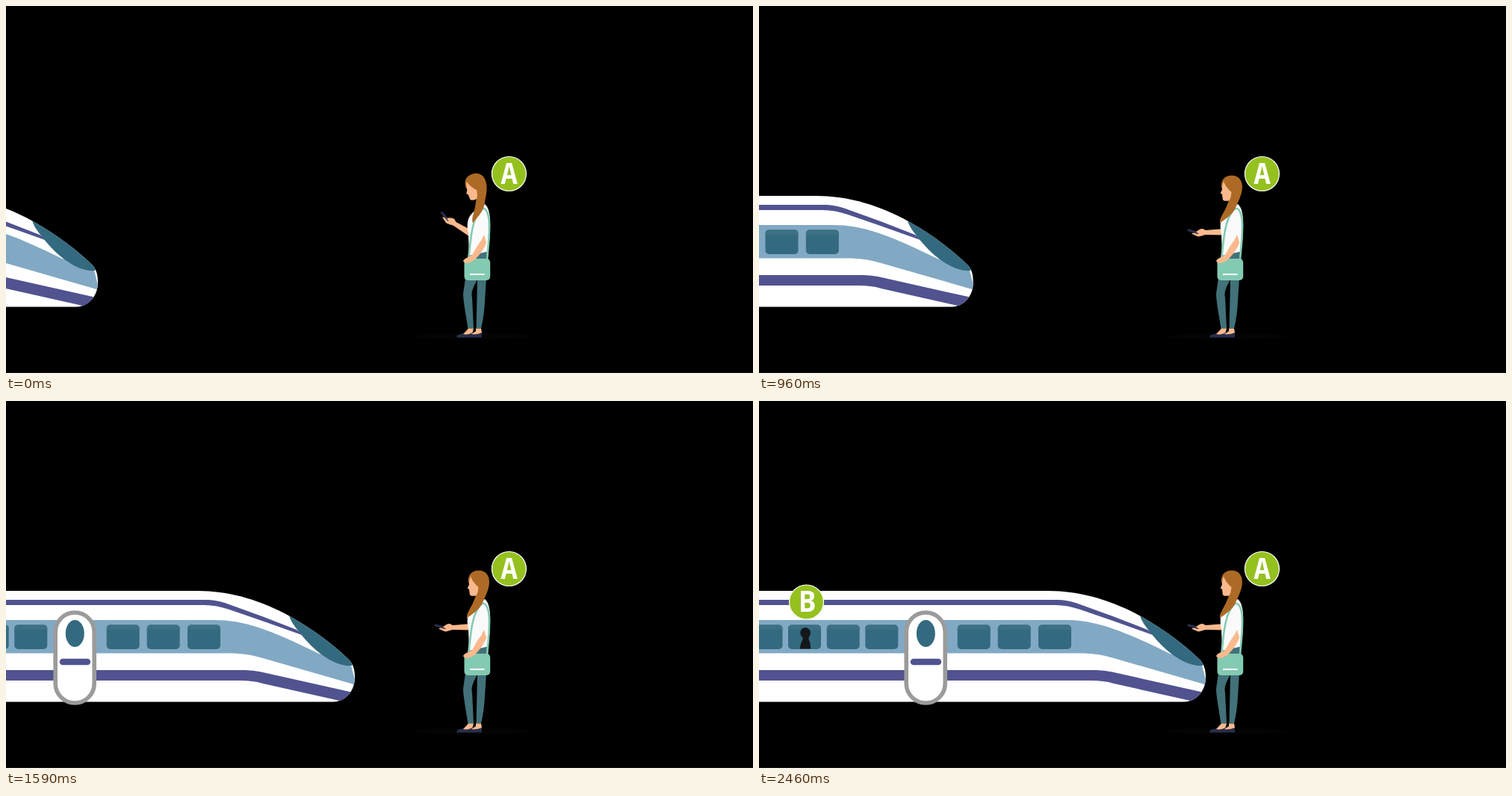
An HTML page that plays this animation: 1000 px wide and 491 px high, repeating every 3600 ms.

```html
<!DOCTYPE html>
<html lang="en">
<head>
<meta charset="utf-8">
<title>Train arriving</title>
<style>
  html, body { margin: 0; width: 100%; height: 100%; overflow: hidden; background: #000; }
  svg { display: block; width: 100%; height: 100%; }
  .glass { fill: #346a7f; }
  .purple { fill: #50538f; }
  .skin { fill: #fab98d; }
  .pants { fill: #42717a; }
  .navy { fill: #282e4b; }
  .badge circle { fill: #95c11f; stroke: #fff; stroke-width: 1.2; }
  .badge text {
    font: bold 38.5px "Noto Sans Mono", "DejaVu Sans Mono", monospace;
    fill: #fff; text-anchor: middle;
  }
</style>
</head>
<body>
<svg viewBox="0 0 1000 491">
  <defs>
    <clipPath id="hull">
      <path d="M-40 254H388C432 254 475 268 511 288C545 307 570 327 590 346C596 352 598 360 598 370C598 388 585 402.5 569 402.5H-40z"/>
    </clipPath>
  </defs>
  <rect width="1000" height="491"/>
  <rect y="490" width="1000" height="1" fill="#111"/>
  <ellipse cx="625" cy="442" rx="80" ry="4" fill="#040404"/>

  <g id="train">
    <g clip-path="url(#hull)">
      <rect x="-40" y="250" width="640" height="156" fill="#fff"/>
      <path class="purple" d="M-40 266H396C409 266 419 268 428 271.5L475 288.5L520 306L530 314L475 294.5L430 279C418 275 408 273 396 273H-40z"/>
      <path fill="#82a9c4" d="M-40 293H410C450 293 485 306 550 338L592 350L600 380L480 345.5C460 339.5 448 337.5 428 337.5H-40z"/>
      <path class="purple" d="M-40 360H447C458 360 466 361 475 363L600 391V406L475 378C465 375 456 374 445 374H-40z"/>
      <path class="glass" d="M508 284L600 343L594 354C572 356 546 336 530 317C520 305 513 297 510 287z"/>
    </g>
    <g id="windows"></g>
    <path fill="#14171a" d="M55 331.5C55 325 58 321 59 317C54 314 54 305 60 303.5C67 302 71 309 68 314C66 317 66 319 68 322C69 326 69 329 69 331.5z"/>
    <rect x="197.2" y="283" width="52" height="121" rx="26" fill="#fff" stroke="#9b9b9a" stroke-width="5.6"/>
    <ellipse class="glass" cx="223.3" cy="311" rx="12.5" ry="18"/>
    <rect class="purple" x="202.7" y="344.7" width="41.5" height="8.6" rx="4.3"/>
    <circle cx="63.5" cy="269" r="24.3" fill="#000" opacity=".1"/>
    <g class="badge"><circle cx="63.5" cy="269" r="23"/><text x="64.5" y="282">B</text></g>
  </g>

  <g id="woman">
    <path class="pants" d="M620 331L645 326V342H619zM615 364H632C626 375 622 383 624 390L626 431.5L618.5 432C616 415 612 395 612 385zM631 364H643L641 395Q640 415 636 431.5H629.5L630.5 390z"/>
    <path class="navy" d="M603.5 443.5V441C608 438 614 438 618 438L637 436.5V443.5z"/>
    <path class="skin" d="M619 431.5H626L624.5 437Q619 440.5 612 439zM629 431.5H636L637 437Q630 440 623 439L629 435z"/>
    <g id="arm">
      <path class="skin" d="M623 298L598 300L594 298C591 298 588 300 585 302L579 304.5L582 306L588 308.5C592 308 595 306.5 598 306L623 306.5z"/>
      <path d="M575 300L587.5 303.5" fill="none" stroke="#282e4b" stroke-width="3" stroke-linecap="round"/>
      <path class="skin" d="M585 302.5L591 298.5L595 300L589 304.5z"/>
    </g>
    <path fill="#fafafa" d="M641 265C647 270 649 282 648 300C648 315 645 324 645 328.5L620 334L619 305C617 296 617 287 621 281C626 274 634 268 641 265z"/>
    <path d="M619 340C622 310 624 285 635 273C642 266 647 277 647 295C647 315 645 325 644 340" fill="none" stroke="#83cbb4" stroke-width="2.6"/>
    <rect x="613.5" y="338" width="34.7" height="29" rx="5" fill="#83cab2"/>
    <rect x="621" y="358" width="19.5" height="2" fill="#fff"/>
    <path class="skin" d="M640 306L643 316C642 322 636 331 628 339C622 344 614 346 612 341C614 337 620 336 624 333C628 326 632 318 636 314z"/>
    <g id="head">
      <path fill="#ad6a26" d="M619 243C618 232 624 226.8 633 226.8C644 226.8 648.5 236 646.5 247C645 256 641 262 638 270C633 280 624 285 617 290.5C616 284 623 276 626 268L630 258z"/>
      <path class="skin" d="M622 234.5C620 239 620 243 620 245.5L617.8 250.5L620 252L620.7 258C621 261.5 625 261 629.5 260.5L631.5 256L632.5 249C629 246 624 241 622 234.5z"/>
    </g>
  </g>
  <g class="badge"><circle cx="673.4" cy="224.5" r="23"/><text x="673.5" y="237.5">A</text></g>
</svg>
<script>
  const LOOP = 3600, TICK = 30, RIDE = 2430, LOOK = 960;
  const el = id => document.getElementById(id);
  const [train, arm, head] = ['train', 'arm', 'head'].map(el);

  el('windows').innerHTML = [-12.5, 39, 90.7, 142.3, 265.7, 319.7, 374].map(x => `
    <rect class="glass" x="${x}" y="299.5" width="44" height="32.5" rx="5"/>
    <path fill="#3d7085" d="M${x} 306v-1.5q0 -5 5 -5h34q5 0 5 5v1.5z"/>`).join('');

  const ease = (t, span) => {
    const u = Math.min(t / span, 1);
    return u * u * (3 - 2 * u);
  };

  const start = performance.now();
  function draw(now) {
    const t = Math.floor(Math.max(now - start, 0) % LOOP / TICK) * TICK;
    const look = 1 - ease(t, LOOK);
    train.setAttribute('transform', `translate(${475 * (ease(t, RIDE) - 1)} 0)`);
    arm.setAttribute('transform', `rotate(${33 * look} 619 302)`);
    head.setAttribute('transform', `rotate(${-13.5 * look} 620 257)`);
    requestAnimationFrame(draw);
  }
  draw(start);
</script>
</body>
</html>
```
